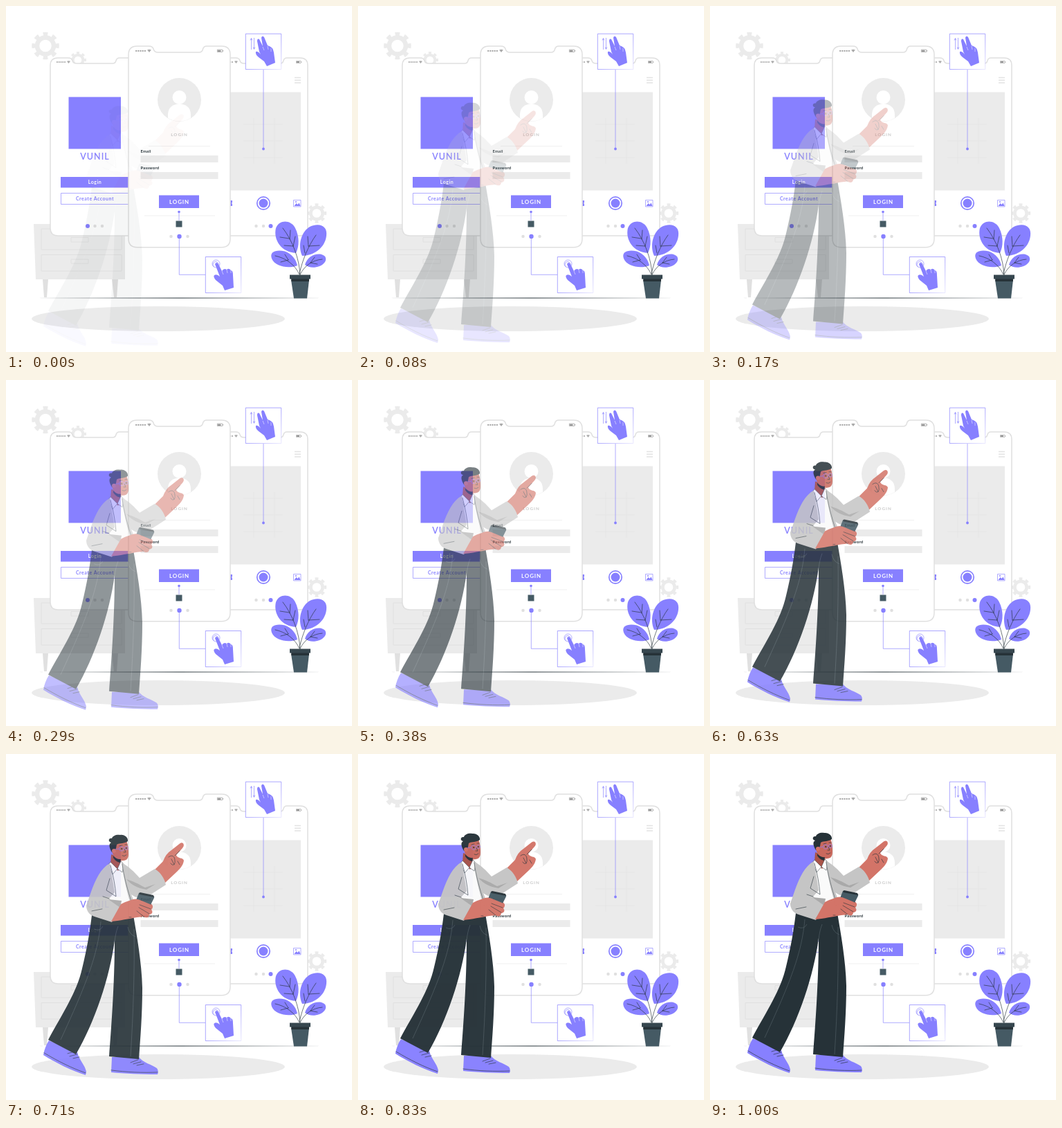
Write an HTML page that moves like this. It is 500 by 500 pixels and loops after 1040 ms.

```html
<!DOCTYPE html>
<html lang="en">
<head>
<meta charset="utf-8">
<title>Login screens</title>
<style>
  html, body { margin: 0; height: 100%; overflow: hidden; background: #fff; }
  svg { display: block; width: 100vw; height: 100vh; }
  text { font-family: Lato, "Open Sans", sans-serif; font-weight: 700; }
  .mid { text-anchor: middle; }
  .p { fill: #8780ff; }
  .pl { fill: none; stroke: #8780ff; stroke-width: .65; }
  .card { fill: #fff; stroke: url(#fade); stroke-width: .7; }
  .g { fill: #ebebeb; }
  .gl { fill: none; stroke: #e0e0e0; }
  .dots { stroke: #e0e0e0; stroke-width: 4.5; stroke-linecap: round; }
  .d { fill: #263238; }
  .dl { fill: none; stroke: #263238; stroke-width: .65; stroke-linecap: round; stroke-linejoin: round; }
  .w { fill: #fff; }
  .skin { fill: #d37468; }
  .coat { fill: #c5c5c5; }
  .shade { fill: #a9a9a9; }
  .fold { fill: none; stroke: #56646b; stroke-width: .6; }
</style>
</head>
<body>
<svg viewBox="0 0 500 500">
  <defs>
    <linearGradient id="fade" x2="1" y2="1">
      <stop offset=".5" stop-color="#8780ff"/>
      <stop offset="1" stop-color="#8780ff" stop-opacity=".25"/>
    </linearGradient>
    <g id="gear" fill="none" stroke="#ebebeb">
      <circle r="12" stroke-width="6.500"/>
      <circle r="17" stroke-width="5.500" pathLength="16" stroke-dasharray="1" stroke-dashoffset=".5"/>
    </g>
    <g id="phone">
      <path d="M11 0H26Q31 0 32 4Q33 8 38 8H90Q94 8 95 4Q96 0 100 0H119Q130 0 130 11V246Q130 257 119 257H11Q0 257 0 246V11Q0 0 11 0Z"
        fill="#fff" stroke="#e0e0e0" stroke-width="1.5" vector-effect="non-scaling-stroke"/>
      <path d="M9 6H22" stroke="#999" stroke-width="1.6" stroke-dasharray="1.8 1"/>
      <path d="M24 4.8Q26.5 3.5 29 4.8L26.5 8Z" fill="#aaa"/>
      <path d="M113.500 4.500H120V7.500H113.500Z" fill="none" stroke="#999" stroke-width=".6"/>
      <path d="M114 5H118V7H114ZM120.500 5.300H121.300V6.700H120.500Z" fill="#999"/>
    </g>
  </defs>

  <use href="#gear" x="57" y="57.500"/>
  <use href="#gear" transform="translate(104 78) scale(.61)"/>
  <use href="#gear" transform="translate(449 299.500) scale(.72)"/>

  <!-- cabinet and floor -->
  <ellipse class="g" cx="220" cy="452" rx="183" ry="18"/>
  <path d="M53 395H61L59 421H55ZM153 395H162L160 421H156Z" fill="#e0e0e0"/>
  <path class="g" d="M40 315H172V395H43Z"/>
  <path class="gl" d="M51 322H167V352H51ZM51 359.500H167V383H51ZM94 334.500H119V341H94ZM94 366H119V372H94Z"/>
  <path class="d" d="M39 422Q250 421.200 463 422Q250 422.800 39 422Z"/>

  <!-- welcome screen -->
  <use href="#phone" x="64" y="75"/>
  <path class="p" d="M90.500 131.500H166V206.500H90.500ZM79 247H177V262.500H79Z"/>
  <text class="mid p" x="128.500" y="222" font-size="12.500" letter-spacing="1" style="font-weight:600">VUNIL</text>
  <text class="mid w" x="128.500" y="257.300" font-size="7" letter-spacing=".5">Login</text>
  <path class="pl" d="M79.500 270.500H190V286.500H79.500Z"/>
  <text class="mid p" x="128.500" y="281" font-size="7" letter-spacing=".5">Create Account</text>
  <circle class="p" cx="118" cy="318" r="3"/>
  <path class="dots" d="M128.500 318h.01M139 318h.01"/>

  <!-- camera screen -->
  <use href="#phone" x="306" y="75"/>
  <path d="M417 103.500H426M417 107.300H426M417 111H426" stroke="#e3e3e3" stroke-width="1.500"/>
  <path class="g" d="M315 124.500H426V266.500H315Z"/>
  <path d="M358 162V228M388 162V228M343 171H400M343 219H400M343 195H400" stroke="#e5e5e5" fill="none"/>
  <path class="p" d="M321 281H327V284L326 285L327 286V289H321Z"/>
  <circle class="p" cx="372" cy="285" r="6.500"/>
  <circle class="pl" cx="372" cy="285" r="9.200" style="stroke-width:1.700"/>
  <path class="pl" d="M415.500 280.500H426V290H415.500Z"/>
  <path class="p" d="M416.500 289L419.500 285L421.500 287L423.500 284.500L425.500 289Z"/>
  <circle class="p" cx="419" cy="283" r="1"/>
  <path class="dots" d="M361.500 318h.01M372 318h.01"/>
  <circle class="p" cx="382.500" cy="318" r="3"/>

  <!-- login screen -->
  <use href="#phone" transform="translate(177 58) scale(1.131)"/>
  <circle class="g" cx="250.500" cy="135.500" r="31.500"/>
  <circle class="w" cx="250.500" cy="132" r="10"/>
  <path class="w" d="M234 162V157C234 146 242 141.500 250.500 141.500S267 146 267 157V162Q251 171 234 162Z"/>
  <text class="mid" x="250.500" y="187.500" font-size="6.300" letter-spacing="1" fill="#cacaca">LOGIN</text>
  <path d="M206 202.500H295M200 303H302" stroke="#ededed" stroke-width=".8"/>
  <text class="d" x="194.500" y="212" font-size="5.800" letter-spacing=".25">Email</text>
  <text class="d" x="194.500" y="236" font-size="5.800" letter-spacing=".25">Password</text>
  <path class="g" d="M194.500 216H306.500V226H194.500ZM194.500 240H306.500V250H194.500Z"/>
  <path class="p" d="M221 273.500H279V292H221Z"/>
  <text class="mid w" x="250.500" y="285.800" font-size="8" letter-spacing=".8">LOGIN</text>
  <path d="M245.500 310.500H254.500V319.500H245.500Z" fill="#455a64"/>
  <path class="dots" d="M238.500 333h.01M262.500 333h.01"/>
  <circle class="p" cx="250.500" cy="333" r="3.200"/>
  <circle class="p" cx="250" cy="297.500" r="1.800"/>
  <path class="pl" d="M250 297V310M250.300 333V388.300H288"/>

  <!-- gesture cards -->
  <path class="pl" d="M372 92V206"/>
  <circle class="p" cx="372" cy="206.500" r="1.900"/>
  <path class="card" d="M346.300 40.200H397.700V91.600H346.300Z"/>
  <path class="pl" d="M354.500 63V47M353 49.500L354.500 46.500L356 49.500M358.500 46V62M357 59.500L358.500 62.500L360 59.500"/>
  <path class="p" d="M366 66L363 51Q363 46 366 48L371 58L369 46Q370 42 373 45L378 57Q386 59 387 67L389 82L377 87L373 80L365 74Q360 70 361 66Q364 65 368 70Z"/>
  <path d="M371 59L373 64M378 58L379 63M383 61V66" stroke="#fff" stroke-width=".5"/>
  <path class="card" d="M288.300 362.500H339.700V414.500H288.300Z"/>
  <circle class="pl" cx="303.500" cy="372.500" r="5.500"/>
  <path class="pl" d="M301 377A4 4 0 1 1 307 374"/>
  <path class="p" d="M302 373Q304 369 307 373L312 383Q315 378 319 381Q322 378 325 382Q328 382 328 389L329 407L316 411L313 404L303 396Q299 391 301 389Q305 387 309 391Z"/>
  <path d="M312 383L314 388M319 381L320 386M325 382L325 386" stroke="#fff" stroke-width=".5"/>

  <!-- plant -->
  <g class="p">
    <path d="M419 357C398 356 386 338 390 321C395 308 412 309 418 321C424 333 424 347 419 357Z"/>
    <path d="M428 361C421 345 427 326 439 319C452 313 465 317 463 332C461 350 444 361 428 361Z"/>
    <path d="M421 375C409 380 389 377 384 365C380 354 392 352 403 354.500C413 358 419 366 421 375Z"/>
    <path d="M432 374C435 363 446 357 456 359C466 362 463 372 453 376C445 379 437 378 432 374Z"/>
  </g>
  <path class="dl" d="M425 389C424 365 414 339 400 321M424 387C428 368 437 346 448 331M424 388C418 374 404 364 389 361M425 388C432 374 444 367 457 366M410 337L411 324M415 347L418 333M409 336L396 334M415 347L402 346M437 347L436 333M432 357L430 346M437 347L453 346M408 367L403 359M408 367L397 370M440 371L446 363M440 371L450 373"/>
  <path d="M412 396H438L435 422.500H416Z" fill="#455a64"/>
  <path class="d" d="M412 394H438V398H412.500Z"/>
  <path d="M410 388.500H440V394.500H410Z" fill="#37474f"/>

  <g id="man">
    <!-- shoes -->
    <path class="p" d="M62 411L103 428C106 440 114 446 116 456L115 461C94 454 73 444 54 432C55 425 58 417 62 411ZM153 435H192C198 443 211 446 218 451Q221 455 219 460C195 460 172 459 152 457Z"/>
    <path class="dl" d="M55 429C75 441 95 451 115 458M152 454C174 457 198 458 219 457M89 430L99 427M92 434L103 431M97 437L106 435M180 443L191 439M184 445L195 442M189 447L199 445"/>
    <!-- trousers -->
    <path class="d" d="M124 230L184 230C189 259 196 298 197 335C197 374 194 410 192 438L149 434C152 394 157 330 157 266C150 320 128 385 101 431L61 410C82 371 102 342 110 307C117 278 121 255 124 230Z"/>
    <path class="fold" d="M162 246C159 254 158 260 157 268M137 239C133 287 116 330 79 410M185 250C186 310 184 370 180 434M176 247Q178 258 187 261M127 250Q136 254 140 246"/>
    <!-- shirt -->
    <path d="M151 154L169 153C174 170 181 190 184 213L180 234H148L145 180Z" fill="#fafafa"/>
    <!-- neck and head -->
    <path d="M152 142L166 147L167 157L162 166L151 155Z" fill="#a95449"/>
    <path d="M153 130L174 122C177 130 177 136 177 142C177 149 173 152 166 151C159 150 154 144 153 137Z" fill="#c9695d"/>
    <path class="d" d="M153 139C149 132 148 127 152 125C147 124 148 118 153 119C154 115 160 113 165 114C171 113 177 118 176 123C171 127 165 125 160 128L158 138ZM155 144Q160 150 166 149L165 154Q159 153 155 147Z"/>
    <path class="dl" d="M164 130L168 129M172 128L175 128M171 134L173 139L170 139M168 144Q171 146 174 143"/>
    <g class="pl">
      <circle cx="167" cy="134" r="3.300"/><circle cx="174" cy="133" r="2.500"/><path d="M156 135L164 134"/>
    </g>
    <path class="d" d="M166.500 133h1.600v2h-1.600zM173 132h1.400v2H173z"/>
    <circle class="skin" cx="156" cy="137" r="3"/>
    <path class="w" d="M151 153L161 163L154 171L148 157ZM166 152L161 163L168 168L170 156Z" stroke="#263238" stroke-width=".5"/>
    <!-- raised arm -->
    <path class="skin" d="M215 164L227 152Q231 141 239 136L251 126.500C256 123 259 129 255 133L246 143C248 149 256 146 257 151C256 159 250 164 246 168L230 183Z"/>
    <path class="dl" d="M235 146C240 142 244 145 244 151C245 157 241 160 238 155M239 149L243 157M244 144L251 137M248 152L251 157"/>
    <path class="coat" d="M167 154C177 159 186 168 193 176L215 163C223 168 229 176 231 186L203 204C195 207 186 204 181 200L186 212L181 216C174 195 170 175 167 154Z"/>
    <path class="shade" d="M174 178C184 181 190 184 201 190L216 185L203 193C190 191 181 186 174 178Z"/>
    <path class="dl" d="M168 156C170 174 176 194 182 213" style="stroke-width:.5"/>
    <!-- near arm -->
    <path class="coat" d="M150 155C137 162 129 179 123 196L116 216C116 224 121 230 128 232L153 240L167 217L149 206L157 197C155 182 152 168 150 155Z"/>
    <path class="dl" d="M151 158C155 173 158 188 159 203L145 194L150 177M140 203L149 206M124 224L139 221" style="stroke-width:.6"/>
    <path class="shade" d="M148 207L167 209L165 219Z"/>
    <path class="skin" d="M152 239L166 214C175 209 184 207 192 208L209 213C214 216 212 220 210 222C213 225 211 229 207 229C207 233 203 235 199 232C186 233 175 236 161 238Z"/>
    <path d="M192 198L213 202Q215 203 214 205L208 217L188 208Z" fill="#455a64"/>
    <path class="d" d="M192 198L194 197L213 201L214 204L193 200Z"/>
    <path class="skin" d="M178 209Q187 204 196 209L208 214Q213 217 210 220L193 216L181 219Z"/>
    <path class="dl" d="M193 215L209 221M192 219L207 228M189 224L199 232M178 233h3" style="stroke-width:.6"/>
  </g>
</svg>
<script>
  const man = document.getElementById("man");
  const LOOP = 1040, FPS = 24, STEPS = 25, RISE = 32;

  function draw(now) {
    const step = Math.floor((now % LOOP + 3) * FPS / 1000);
    const left = (1 - Math.min(1, (step + .5) / STEPS)) ** 2; // quadratic ease-out
    man.setAttribute("transform", `translate(0 ${RISE * left})`);
    man.setAttribute("opacity", 1 - left);
  }

  const start = performance.now();
  function tick() {
    draw(performance.now() - start);
    requestAnimationFrame(tick);
  }
  tick();
</script>
</body>
</html>
```
